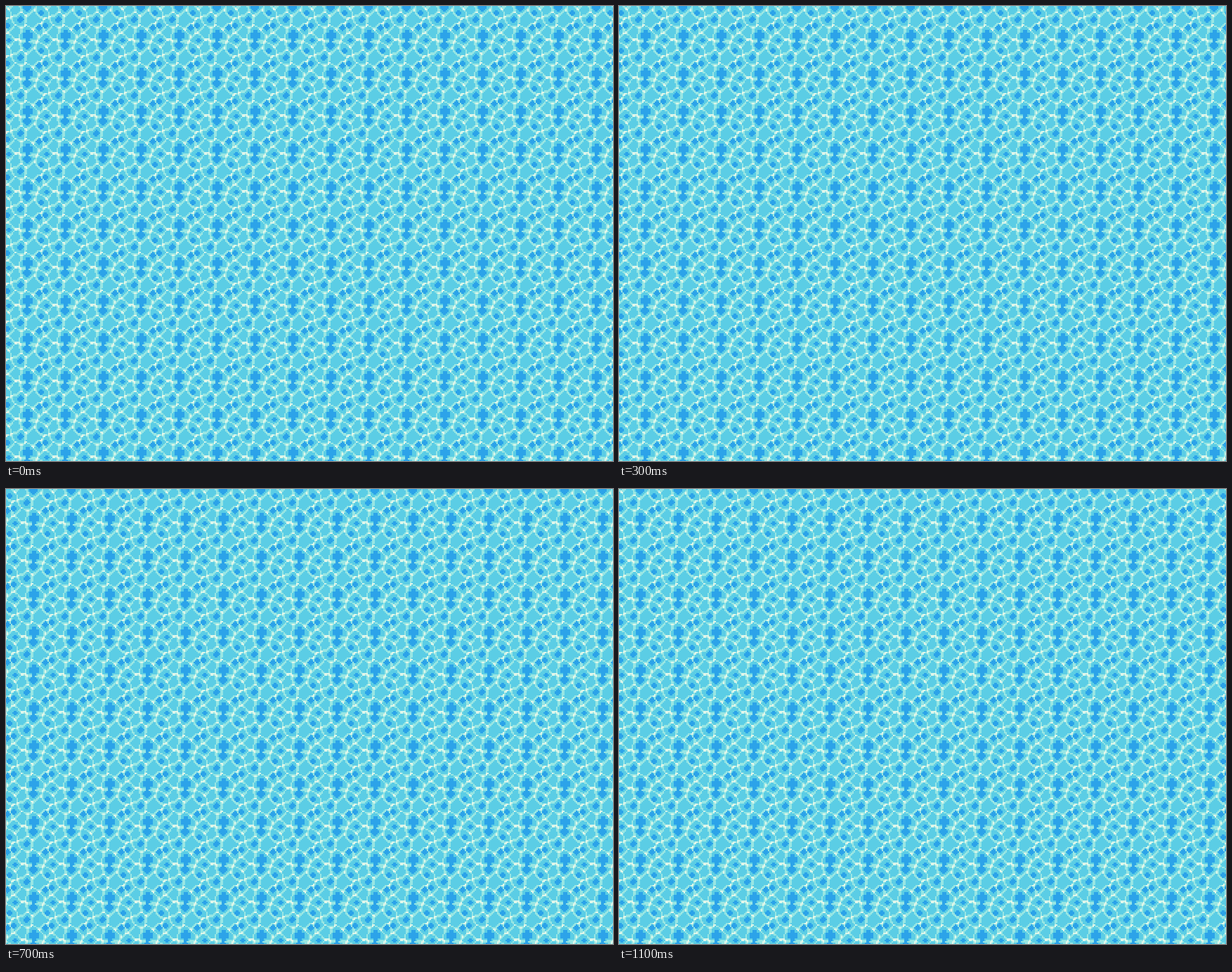
Animation, 864 px wide and 648 px high, one loop 1700 ms. Source, as an HTML page with a canvas:

```html
<!DOCTYPE html>
<html lang="en">
<head>
<meta charset="utf-8">
<title>Water</title>
<style>
  html, body { margin: 0; height: 100%; overflow: hidden; background: #5bcde5; }
  canvas { display: block; }
</style>
</head>
<body>
<canvas id="stage" width="864" height="648"></canvas>
<script>
const N = 27;      // cells along one side of the repeating tile
const CELL = 2;    // pixels per cell
const DRIFT = 2.4; // pixels per step
const STEP = 100, LOOP = 1700;
const BASE = '#5bcde5', DARK = '#2ca3e9', LIGHT = '#98e6e3', WHITE = '#dff6ea';

// Pools of water: centre, size, and whether the middle is deep
const pools = [
  { x: 15.5, y: 21, r: 3.6, deep: true },
  { x: 15, y: 1.2, r: 2.8, deep: true },
  { x: 2.2, y: 24.5, r: 1.8, deep: true },
  { x: 10.3, y: 9.7, r: 2.1, deep: true },
  { x: 25, y: 4.6, r: 2, deep: true },
  { x: 23.5, y: 15.7, r: 2.1, deep: true },
  { x: 1, y: 14, r: 1.8, deep: true },
  { x: 20, y: 10, r: 4, deep: false },
  { x: 7, y: 2, r: 2, deep: false },
  { x: 7, y: 19, r: 2, deep: false }
];

// Shortest signed distance on the wrapping tile
const gap = (a, b) => a - b - N * Math.round((a - b) / N);

// Light gathers where two pools meet and is brightest where three do
function shade(x, y) {
  const near = pools.map(p => {
    const dx = gap(x, p.x), dy = gap(y, p.y);
    const lobes = 1 + .13 * Math.cos(4 * Math.atan2(dy, dx));
    return { deep: p.deep, edge: Math.hypot(dx, dy) - p.r * lobes };
  }).sort((a, b) => a.edge - b.edge);
  const [first, second, third] = near;
  const turn = 2 * Math.PI / N;
  const width = 1.3 + .6 * Math.sin(3 * turn * x) * Math.cos(2 * turn * y);
  if (first.deep && first.edge < 0) return DARK;
  if (third.edge - first.edge < 1.3) return WHITE;
  return second.edge - first.edge < width ? LIGHT : BASE;
}

const tile = document.createElement('canvas');
tile.width = tile.height = N;
const pen = tile.getContext('2d');
for (let y = 0; y < N; y++)
  for (let x = 0; x < N; x++) {
    pen.fillStyle = shade(x + .5, y + .5);
    pen.fillRect(x, y, 1, 1);
  }

const ctx = document.getElementById('stage').getContext('2d');
const water = ctx.createPattern(tile, 'repeat');
ctx.imageSmoothingEnabled = false;

function frame(now) {
  const s = Math.floor(now % LOOP / STEP);
  const step = Math.max(0, Math.min(5, s, 11 - s)); // out, rest, back, rest
  ctx.setTransform(CELL, 0, 0, CELL, Math.floor(step * DRIFT), 0);
  ctx.fillStyle = water;
  ctx.fillRect(-N, 0, 864 / CELL + 2 * N, 648 / CELL);
  requestAnimationFrame(frame);
}
frame(0);
</script>
</body>
</html>
```
